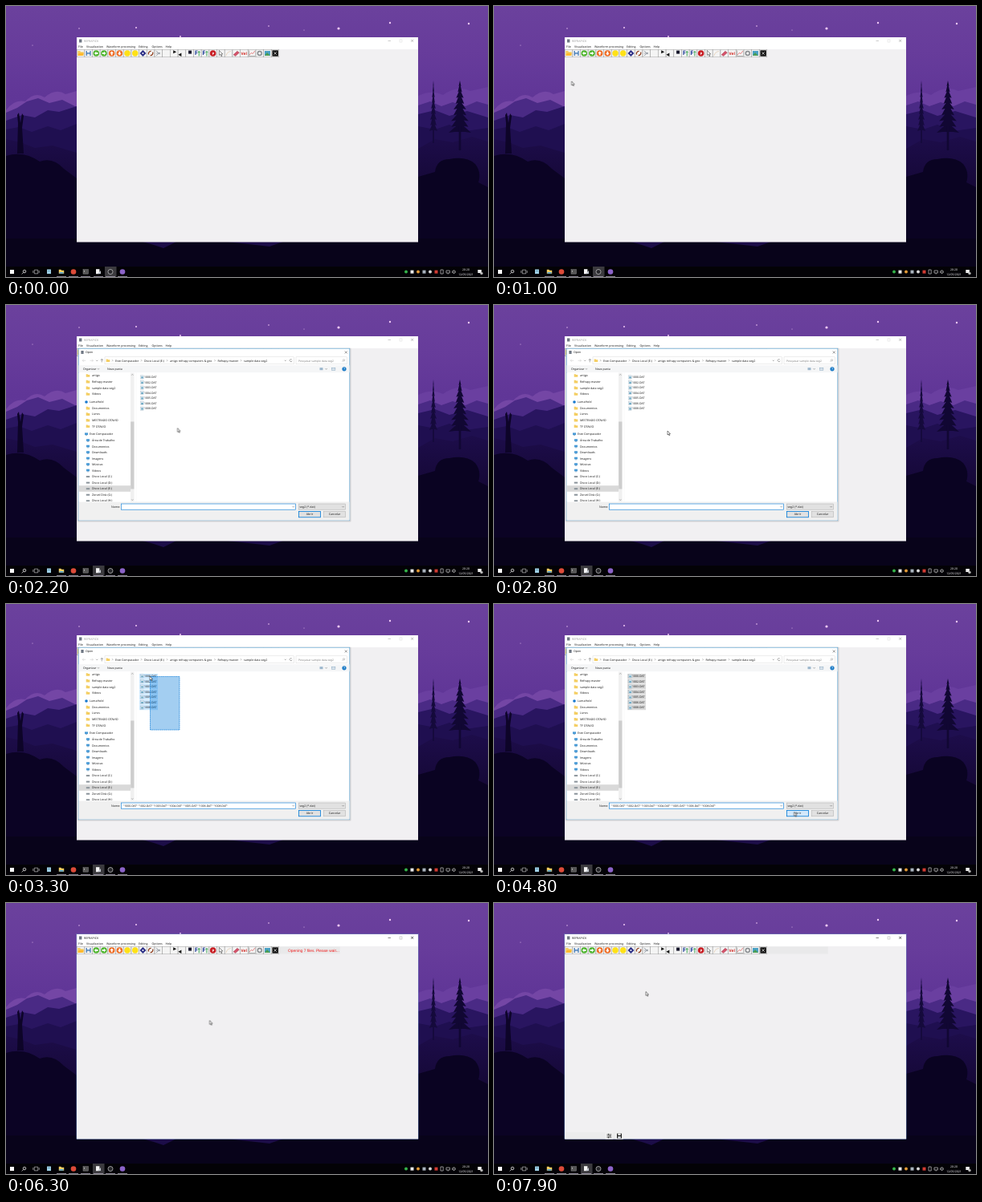
An HTML page for the animation above (8000 ms loop, 600x338 px).

```html
<!DOCTYPE html>
<html lang="en">
<head>
<meta charset="utf-8">
<title>Opening files</title>
<style>
html, body { margin: 0; width: 100%; height: 100%; overflow: hidden; background: #08031a; }
svg { display: block; width: 100%; height: 100%; }
text { font: 3.6px "Open Sans", "Noto Sans", sans-serif; fill: #111; text-rendering: geometricPrecision; white-space: pre; }
.msg { font: 4.85px "Liberation Sans", Arial, sans-serif; fill: #f01818; }

.key { animation: 8s step-end infinite; }
#title, #caption { animation-name: focus; }
#border { animation-name: border; }
#task { animation-name: task; }
#dialog { animation-name: dialog; transform-origin: 259px 161.5px; }
#early { animation-name: early; }
#late { animation-name: late; }
#low { animation-name: low; }
#high { animation-name: high; }
#names { animation-name: names; }
#open { animation-name: hover; }
#strip { animation-name: strip; }
#message { animation-name: message; }
#tools { animation-name: tools; }
#band { animation: bandShow 8s step-end infinite, band 8s linear infinite; }
#cursor { animation: cursor 8s linear infinite; }

@keyframes focus { 0% { fill: #999 } 13.75% { fill: #111 } 18.75% { fill: #999 } 62.5%, 100% { fill: #111 } }
@keyframes border { 0% { opacity: 0 } 13.75% { opacity: 1 } 18.75% { opacity: 0 } 62.5%, 100% { opacity: 1 } }
@keyframes task { 0% { transform: translate(15px) } 13.75%, 100% { transform: none } }
@keyframes dialog {
  0% { opacity: 0; transform: scale(.95) }
  18.75% { opacity: .35; transform: scale(.96) }
  20% { opacity: .72; transform: scale(.974) }
  21.25% { opacity: 1; transform: scale(1) }
  62.5%, 100% { opacity: 0; transform: scale(1) }
}
@keyframes early { 0% { opacity: 1 } 23.75%, 100% { opacity: 0 } }
@keyframes late { 0% { opacity: 0 } 23.75%, 100% { opacity: 1 } }
@keyframes low { 0% { fill: #fff0 } 40% { fill: #cce8ff } 58.75%, 100% { fill: #d9d9d9 } }
@keyframes high { 0% { fill: #fff0 } 41.25% { fill: #cce8ff } 58.75%, 100% { fill: #d9d9d9 } }
@keyframes names { 0% { opacity: 0 } 41.25%, 100% { opacity: 1 } }
@keyframes hover { 0% { fill: #e1e1e1 } 56.25%, 100% { fill: #d3e8fa } }
@keyframes strip { 0% { opacity: 0 } 67.5%, 100% { opacity: 1 } }
@keyframes message { 0% { opacity: 0 } 67.5% { opacity: 1 } 92.5%, 100% { opacity: 0 } }
@keyframes tools { 0% { opacity: 0 } 92.5%, 100% { opacity: 1 } }
@keyframes bandShow { 0% { opacity: 0 } 37.5% { opacity: 1 } 43.75%, 100% { opacity: 0 } }
@keyframes band {
  0%, 36.25% { x: 216px; y: 157px; width: 0; height: 0; animation-timing-function: steps(4) }
  41.25%, 100% { x: 179.5px; y: 90.5px; width: 36.5px; height: 66.5px }
}
@keyframes cursor {
  0% { transform: translate(136px, 345px) }
  3.75% { transform: translate(136px, 345px); animation-timing-function: steps(8) }
  13.75% { transform: translate(91px, 58px) }
  21.25% { transform: translate(91px, 58px); animation-timing-function: steps(5) }
  27.5% { transform: translate(213.5px, 153.5px); animation-timing-function: steps(5) }
  33.75% { transform: translate(216px, 157px) }
  36.25% { transform: translate(216px, 157px); animation-timing-function: steps(4) }
  41.25% { transform: translate(179px, 90px) }
  43.75% { transform: translate(179px, 90px); animation-timing-function: steps(1) }
  45% { transform: translate(190px, 116px); animation-timing-function: steps(10) }
  57.5% { transform: translate(373.5px, 259.5px) }
  62.5% { transform: translate(373.5px, 259.5px); animation-timing-function: steps(8) }
  72.5% { transform: translate(253.5px, 146.5px) }
  81.25% { transform: translate(253.5px, 146.5px); animation-timing-function: steps(9) }
  92.5%, 100% { transform: translate(189px, 110.5px) }
}
</style>
</head>
<body>
<svg id="stage" viewBox="0 0 600 338" preserveAspectRatio="none"></svg>
<script>
const text = (x, y, s, attr = '') => `<text x="${x}" y="${y + 1.3}" ${attr}>${s}</text>`;
const rect = (x, y, w, h, fill, attr = '') => `<rect x="${x}" y="${y}" width="${w}" height="${h}" fill="${fill}" ${attr}/>`;
const dot = (x, y, r, fill, attr = '') => `<circle cx="${x}" cy="${y}" r="${r}" fill="${fill}" ${attr}/>`;
const shape = (d, fill, attr = '') => `<path d="${d}" fill="${fill}" ${attr}/>`;
const line = (d, color, w = .6) => `<path d="${d}" fill="none" stroke="${color}" stroke-width="${w}"/>`;
const group = (id, body, attr = '') => `<g id="${id}" class="key" ${attr}>${body}</g>`;
const edge = (color, w = .5) => `stroke="${color}" stroke-width="${w}"`;

// Landscape
const fade = (id, colors) => `<linearGradient id="${id}" x1="0" y1="0" x2="0" y2="1">${
  colors.map((c, i) => `<stop offset="${i / (colors.length - 1)}" stop-color="${c}"/>`).join('')}</linearGradient>`;

function pine(x, top, bottom, half, fill) {
  const rows = 9, step = (bottom - top) / rows;
  let left = '', right = '';
  for (let i = 1; i <= rows; i++) {
    const w = half * (i / rows) * (i % 2 ? 1 : .85), y = top + i * step;
    right += `L${x + w} ${y}L${x + w * .45} ${y - 1}`;
    left = `L${x - w * .45} ${y - 1}L${x - w} ${y}` + left;
  }
  return shape(`M${x} ${top}${right}${left}Z`, fill);
}

function landscape() {
  const stars = [[91, 28, .7], [162, 27, 1], [217, 38, 1], [327, 25, .8], [414, 28, 1.6], [478, 21, 1.2], [576, 22, 1.2],
    [33, 49, .5], [371, 30, .5]];
  return `<defs>${fade('sky', ['#6b419d', '#673c9b', '#603697', '#643a9c'])}${fade('ground', ['#1d0d4a', '#12062f', '#08031a'])}</defs>`
    + rect(0, 0, 600, 170, 'url(#sky)')
    + stars.map(([x, y, r]) => dot(x, y, r, '#f1c9f5')).join('')
    + shape('M0 130Q10 116 24 119Q36 106 48 114Q62 102 74 110L88 106V150H0Z', '#7446a5')
    + shape('M513 112Q530 104 544 111Q562 98 578 106L600 101V150H513Z', '#6a3fa0')
    + shape('M0 133L14 127L26 119L40 115L54 121L70 117L88 126V160H0ZM513 124L528 119L542 125L556 120L572 125L586 119L600 123V170H513Z', '#4a2a85')
    + shape('M0 143L20 136L36 139L52 130L66 132L88 125V200H0ZM513 135L534 130L552 137L574 131L600 139V200H513Z', '#291560')
    + shape('M0 154L16 151L32 157L52 150L68 155L88 147V210H0ZM513 150L534 154L552 148L572 156L600 152V210H513Z', '#1f0f50')
    + shape('M0 166L18 170L36 177L58 174L88 183L300 200L513 178L534 166L556 170L580 163L600 169V338H0Z', 'url(#ground)')
    + shape('M14 184L15 146L14 136L16 133L18 146L20 134L22 137L20 152L22 184Z', '#0d0428')
    + pine(565, 93, 158, 14, '#110733') + rect(563.7, 150, 2.6, 30, '#110733')
    + pine(532, 93, 156, 5, '#150a3c') + rect(531.2, 125, 1.8, 46, '#150a3c')
    + shape('M0 187Q22 180 42 194Q58 188 72 203L88 215V338H0Z', '#0b0324')
    + shape('M513 213L534 207Q536 191 552 191Q573 187 584 197Q592 207 588 220L600 226V338H513Z', '#0a0322')
    + rect(0, 290, 600, 36, '#08031a')
    + shape('M170 294H212L196 302L184 298ZM275 294H345L328 300L302 297Z', '#1c0d48');
}

// Main window
const folder = (x, y, s = 1) => shape(`M${x - 2.3 * s} ${y + 1.8 * s}v${-3.6 * s}h${1.8 * s}l${.7 * s} ${.7 * s}h${2.1 * s}v${2.9 * s}z`, '#f4ce62');
const floppy = (x, y, c) => rect(x - 3, y - 3, 6, 6, c) + rect(x - 1.7, y - 3, 3.4, 2.2, '#fff') + rect(x - 1.8, y + .6, 3.6, 2.4, '#e4e8ee');
const arrow = (x, y, turn) => `<g transform="translate(${x} ${y}) rotate(${turn})">${shape('M-2.4 0L0 -2.3V-.9H2.2V.9H0V2.3Z', '#fff')}</g>`;
const disc = (c, turn) => x => dot(x, 59, 3.8, c) + arrow(x, 59, turn);
const plain = c => x => dot(x, 59, 3.7, c);
const filterIcon = x => text(x - 3.6, 60, 'F', 'style="font-size:7.5px;font-weight:700;fill:#233f9b"')
  + line(`M${x + 2} 62.5v-6m-1.3 1.6l1.3 -1.6l1.3 1.6`, '#2c9d45', .9);

const icons = [
  x => folder(x, 59, 1.6) + shape(`M${x - 3.5} 62l1.5 -3.2h6l-1.6 3.2z`, '#ffb92e'),
  x => floppy(x, 59, '#3f78b5'),
  disc('#4fb52f', 0), disc('#4fb52f', 180), disc('#ee6c24', 90), disc('#ee6c24', 270),
  plain('#ffe117'), plain('#ffe117'),
  x => shape(`M${x} 55l4 4l-4 4l-4 -4z`, '#2c2f86') + dot(x, 59, 1, '#fff'),
  x => line(`M${x - 2.5} 60.5a3 3 0 0 1 3 -4.2M${x + 2.5} 57.5a3 3 0 0 1 -3 4.2`, '#8a3513', 1.2),
  x => line(`M${x - 3} 56l5 4M${x - 3} 62l5 -4M${x - 3} 59h5`, '#7b8591', .7),
  () => '',
  x => shape(`M${x - 1} 55.3l4 2l-4 2z`, '#111'),
  x => shape(`M${x - 4.5} 60.8l4 -2.2v4.4z`, '#111'),
  x => rect(x - 1.5, 55.6, 4, 4, '#16162a'),
  filterIcon, filterIcon,
  x => dot(x, 59, 3.8, '#c71f25') + text(x - 1.2, 59.2, 'P', 'style="font-size:4.4px;font-weight:700;fill:#fff"'),
  x => shape(`M${x - 2} 55.5v6l1.5 -1.2l1.2 2.5l1 -.5l-1.2 -2.4h2z`, '#fff', edge('#222')),
  x => line(`M${x - 3} 62q1 -5 6 -5.5`, '#d9b58e', .5),
  x => shape(`M${x - 3.6} 60.8l4.8 -4.6l2.5 2l-4.8 4.4z`, '#d4536a', edge('#923148', .4)),
  x => text(x - 3.8, 59.3, 'Vel', 'style="font-size:4.8px;font-weight:700;fill:#d12a25"'),
  x => line(`M${x - 3.5} 55.5v7h7.5`, '#666', .5) + line(`M${x - 3} 61l2.2 -2.5l2 1l2.5 -3.5`, '#df5a5a', .7),
  x => dot(x, 59, 2.5, '#eee', edge('#85898d', 1.4)),
  x => rect(x - 3.5, 56, 7, 6, '#4aa1c4') + shape(`M${x - 3.5} 62l3 -4l4 4z`, '#4c9d54'),
  x => rect(x - 3.7, 55.3, 7.4, 7.4, '#111') + line(`M${x - 1.7} 57.3l3.4 3.4m0 -3.4l-3.4 3.4`, '#fff', .7)
];

function mainWindow() {
  const menus = [[90, 'File'], [100, 'Visualization'], [125, 'Waveform processing'], [165, 'Editing'], [181.5, 'Options'], [198.5, 'Help']];
  const buttons = icons.map((icon, i) => {
    const x = 88.2 + i * 9.69;
    return rect(x, 54.4, 9.4, 9.4, '#f4f4f4', edge('#8f8f8f', .4)) + icon(x + 4.7);
  }).join('');
  const sliders = [288.6, 290.5, 292.4].map((y, i) => line(`M140.4 ${y}h6`, '#222', .6) + rect(142 + i % 2 * 2, y - .8, 1, 1.6, '#222')).join('');
  return rect(88, 39, 425, 255.5, '#f1f0f2')
    + group('border', rect(87.8, 38.8, 425.4, 255.9, 'none', edge('#6f93c9', .4)))
    + rect(88, 39, 425, 15, '#fff') + rect(91, 41.5, 3.4, 4, '#6f7784')
    + text(97, 43.6, 'REFRAPICK', 'id="title" class="key"')
    + group('caption', `<path d="M475.5 43.3h3.4v.5h-3.4z"/>
      <path d="M489.8 41.8h3.4v3.4h-3.4zm.4 .4v2.6h2.6v-2.6z" fill-rule="evenodd" opacity=".4"/>
      <path d="M504 42l.3 -.3l1.4 1.4l1.4 -1.4l.3 .3l-1.4 1.4l1.4 1.4l-.3 .3l-1.4 -1.4l-1.4 1.4l-.3 -.3l1.4 -1.4z"/>`)
    + menus.map(([x, s]) => text(x, 51, s)).join('')
    + group('strip', rect(340.2, 54.5, 75.5, 9, '#e9e9ea'))
    + group('message', text(351, 59.3, 'Opening 7 files. Please wait...', 'class="msg"'))
    + buttons
    + group('tools', rect(88.5, 286, 72, 8.4, '#ececed') + rect(138.6, 286.3, 9.5, 8, '#f3f3f3') + rect(151.4, 286.3, 9.5, 8, '#f3f3f3')
      + sliders + floppy(156, 290.5, '#222'));
}

// File dialog
const files = [1000, 1002, 1003, 1004, 1005, 1006, 1008].map(n => n + '.DAT');
const rowY = i => 90 + i * 6.52;

const marks = {
  folder: folder,
  cloud: (x, y) => dot(x, y, 1.8, '#1779cf'),
  disk: (x, y) => rect(x - 2.2, y - .7, 4.4, 2, '#8b949b'),
  page: (x, y) => rect(x - 1.7, y - 2.1, 3.4, 4.2, '#fff', edge('#9a9a9a', .4)),
  screen: (x, y) => rect(x - 2, y - 1.6, 4, 2.7, '#4a9bd6') + rect(x - 1, y + 1.4, 2, .5, '#4a7fa6')
};
const sideRow = ([y, s, kind, deep]) => marks[kind](deep ? 102 : 100, y) + text(deep ? 107 : 104, y, s);
const nested = (rows, kind, y, step) => rows.map((s, i) => [y + i * step, s, kind, true]);

const ownFolders = ['Documentos', 'Livros', 'MESTRADO OTAVIO', 'TF OTAVIO'];
const earlyRows = [[93.5, 'Acesso rápido', 'screen'], [102.6, 'LumaHold', 'cloud'],
  ...nested(ownFolders, 'folder', 110.7, 7.6), [143.4, 'Este Computador', 'screen'],
  [153.6, 'Disco Local (G:)', 'page'], [163.2, 'Disco Local (E:)', 'page'], [173.2, 'Rede', 'screen']];
const lateRows = [...nested(['artigo', 'Refrapy-master', 'sample data seg2', 'Vídeos'], 'folder', 88, 7.67),
  [121, 'LumaHold', 'cloud'], ...nested(ownFolders, 'folder', 128.6, 7.55), [161, 'Este Computador', 'screen'],
  ...nested(['Área de Trabalho', 'Documentos', 'Downloads', 'Imagens', 'Músicas', 'Vídeos'], 'screen', 168.8, 7.5),
  ...nested(['Disco Local (C:)', 'Disco Local (D:)', 'Disco Local (E:)', 'Zorvel Disk (G:)', 'Disco Local (H:)'], 'disk', 213.8, 7.55)];

function dialog() {
  const path = [[136, 'Este Computador'], [172, 'Disco Local (E:)'], [204, 'artigo refrapy computers &amp; geo'], [263.5, 'Refrapy-master'], [296, 'sample data seg2']];
  const picks = low => files.map((_, i) => i).filter(i => low === i > 2)
    .map(i => `<rect x="166" y="${rowY(i) - 3}" width="23" height="6.1"/>`).join('');
  const list = files.map((s, i) => rect(167.8, rowY(i) - 2.1, 3.4, 4.2, '#dbe8f0', edge('#8ba2b2', .3))
    + rect(168.4, rowY(i) - .6, 2.2, 2, '#5d9fbd') + text(172, rowY(i), s, 'style="font-size:3.5px"')).join('');
  const header = rect(93.4, 57, 3.2, 4, '#6f7784') + text(99, 59, 'Open')
    + line('M99.2 69.3h-4m1.5 -1.5l-1.5 1.5l1.5 1.5M104.5 69.3h4m-1.5 -1.5l1.5 1.5l-1.5 1.5', '#c4c4c4', .5)
    + line('M112.2 68.8l1 1l1 -1M119.3 71.4v-4m-1.5 1.5l1.5 -1.5l1.5 1.5', '#555', .5)
    + rect(123, 64.8, 235.5, 9, '#fff', edge('#d9d9d9')) + folder(127, 69.3)
    + path.map(([x, s]) => line(`M${x - 4} 68.2l1 1.1l-1 1.1`, '#555', .4) + text(x, 69.3, s)).join('')
    + line('M346.8 68.8l1 1l1 -1M355.8 68.2a1.5 1.5 0 1 0 .3 1.5', '#555', .5)
    + rect(361, 64.8, 63.5, 9, '#fff', edge('#d9d9d9')) + text(364, 69.3, 'Pesquisar sample data seg2', 'style="font-size:3.4px;fill:#777"')
    + dot(420.6, 68.8, 1.1, 'none', edge('#777', .4)) + line('M419.8 69.6l-1.2 1.2', '#777', .4)
    + text(96, 79.7, 'Organizar') + line('M114 79.3l1 1l1 -1', '#444', .5) + text(126, 79.7, 'Nova pasta')
    + rect(390.5, 78.2, 4, 3, '#9bb6cc') + line('M397.6 79.3l1 1l1 -1', '#444', .5);
  const footer = text(131, 251.8, 'Nome:')
    + rect(143.5, 248, 217, 7.2, '#fff', edge('#0078d7', .6)) + line('M356.6 251.2l1 1l1 -1', '#444', .5)
    + group('names', text(146, 251.6, files.map(s => `"${s}"`).join(' '), 'style="font-size:3.45px"'))
    + rect(364.3, 248, 58.4, 7.2, '#e1e1e1', edge('#adadad')) + text(365.5, 251.6, 'seg2 (*.dat)') + line('M418.6 251.2l1 1l1 -1', '#444', .5)
    + `<rect id="open" class="key" x="364.4" y="257.4" width="27" height="7.4" ${edge('#0078d7', .8)}/>` + text(378, 261, 'Abrir', 'text-anchor="middle"')
    + rect(395.3, 257.4, 27.4, 7.4, '#e1e1e1', edge('#adadad')) + text(409, 261, 'Cancelar', 'text-anchor="middle"');
  const sidebar = rect(90.5, 84.6, 69.5, 160.8, '#fff') + rect(90.5, 225.2, 64.5, 7.6, '#d9d9d9')
    + `<g clip-path="url(#side)">${lateRows.map(sideRow).join('')}</g>`
    + rect(155, 84.6, 4.6, 160.8, '#f0f0f0') + rect(155.2, 145.5, 4.2, 84, '#cdcdcd')
    + line('M156.3 87.5l1 -1l1 1M156.3 242.5l1 1l1 -1', '#555', .5)
    + line('M162 84.5V245.5', '#eee', .4);
  const ghosts = [[131, 250, 11, 4], [143.5, 248, 217, 7], [364, 248, 59, 7], [364, 257.5, 27, 7], [395, 257.5, 27, 7]]
    .map(b => rect(...b, '#fbfbfb')).join('');
  return '<clipPath id="side"><rect x="90" y="84.6" width="66" height="160.6"/></clipPath>' + group('dialog',
    rect(88.5, 53.5, 341, 217, '#000', 'opacity=".12" rx="1"')
    + rect(90.2, 54.2, 337.6, 214.6, '#fff', edge('#4f9fd3', .6))
    + rect(90.5, 75.2, 337, 9, '#f5f6f7') + rect(90.5, 245.5, 337, 23, '#f0f0f0')
    + line('M421.8 57.5l3 3m0 -3l-3 3', '#333', .5)
    + rect(405.5, 78.2, 4.4, 3.2, '#d8e3ec', edge('#7698b4', .4))
    + dot(421, 79.8, 2.6, '#1a7ac6') + text(421, 79.8, '?', 'text-anchor="middle" style="fill:#fff;font-weight:700"')
    + group('high', picks(false)) + group('low', picks(true))
    + list
    + group('early', ghosts + rect(90.5, 139.6, 69, 7.6, '#d9d9d9') + earlyRows.map(sideRow).join(''))
    + group('late', header + sidebar + footer)
    + `<rect id="band" fill="#0078d7" fill-opacity=".36" ${edge('#0078d7', .7)} stroke-dasharray="1.2 .5"/>`);
}

// Taskbar
function taskbar() {
  const tray = ['#35b34a', '#e8e8e8', '#e29a36', '#a9b3bd', '#d8d8d8', '#d23b32'];
  return rect(0, 325, 600, 13, '#030206')
    + group('task', rect(108, 325, 14.5, 13, '#3b3a3e'))
    + rect(5, 329, 5, 5, '#fff')
    + dot(23, 331, 1.8, 'none', edge('#fff', .7)) + line('M21.7 332.4l-2 2', '#fff', .7)
    + line('M35.3 329.2h4.4v4.6h-4.4zM33.8 330v3M41.2 330v3', '#ddd', .6)
    + rect(51, 328.5, 5, 5.5, '#9fd0e6') + rect(52, 330, 3, .6, '#437f9b')
    + folder(69, 331.3, 1.4) + rect(66.5, 332, 5, 1.6, '#53a6dc')
    + dot(84, 331.5, 3.3, '#dd4b39')
    + rect(96, 328.7, 6.4, 5.4, '#555', edge('#aaa', .4)) + line('M97 330l1 .8l-1 .8', '#fff', .5)
    + rect(112, 328.2, 4.4, 6, '#f4f4f4') + shape('M114 334l4 -4v4z', '#c3c8d0')
    + dot(130, 331.5, 3, '#26262a', edge('#d0d0d0', .7))
    + dot(145, 331.5, 3.3, '#8c63c8')
    + [69, 84, 99, 115, 130, 145].map(x => rect(x - 6, 337.2, 12, .8, '#a9a2b4')).join('')
    + tray.map((c, i) => i % 2 ? rect(496 + i * 7.5, 329.6, 4, 4, c) : dot(498 + i * 7.5, 331.6, 2, c)).join('')
    + line('M541 329h3.2v5h-3.2zM548 330h4.4v3h-4.4zM550.2 333v1.5M555.5 330.7h1l1.4 -1.3v4.6l-1.4 -1.3h-1zM559 330.2q1 1.4 0 2.8', '#e5e5e5', .6)
    + text(572.5, 328.7, '20:20', 'text-anchor="middle" style="fill:#fff;font-size:3.5px"')
    + text(572.5, 334.6, '12/05/2021', 'text-anchor="middle" style="fill:#fff;font-size:3.5px"')
    + rect(587.3, 329, 4.6, 4, '#eee') + dot(592, 333.4, 1.7, '#bbb');
}

const cursor = `<g id="cursor">${shape('M0 0V5L1.2 4L2 5.8L2.8 5.4L2 3.7H3.5Z', '#fff', edge('#111', .5))}</g>`;

document.getElementById('stage').innerHTML = landscape() + mainWindow() + dialog() + taskbar() + cursor;
</script>
</body>
</html>
```
